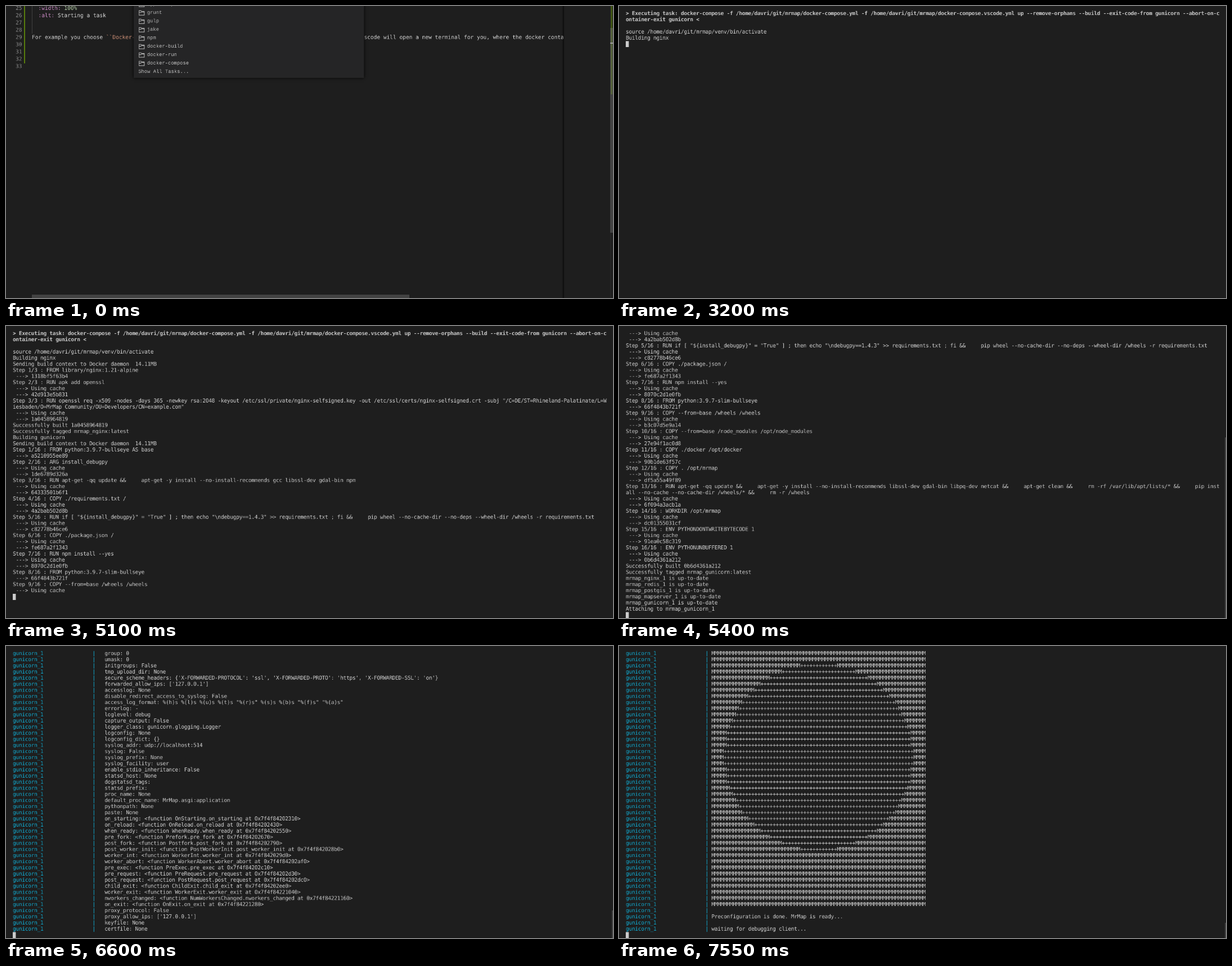
An HTML page that plays this animation: 1079 by 519 pixels, repeating every 8000 ms.

```html
<!DOCTYPE html>
<html lang="en">
<head>
<meta charset="utf-8">
<title>Starting a task</title>
<style>
  html, body { margin: 0; width: 100%; height: 100%; overflow: hidden; background: #1e1e1e; }
  #stage { position: relative; width: 1079px; height: 519px; overflow: hidden; background: #1e1e1e;
    text-rendering: geometricPrecision; }
  #stage div, #stage pre, #stage svg { position: absolute; margin: 0; white-space: pre; }
  .scene { inset: 0; visibility: hidden; }
  .scene.on { visibility: visible; }

  /* Text is laid out on the full-size pixel grid, then reduced as a picture. */
  #stage pre, .popup { font: 14px "DejaVu Sans Mono", monospace;
    transform: scale(.68); transform-origin: 0 0; will-change: transform; }

  #stage .term pre { left: 12.2px; top: 8.3px; line-height: 16px; letter-spacing: -.4286px; color: #ccc; }
  .term i { font-style: normal; color: #11a8cd; }
  .term mark { background: #ccc; color: #1e1e1e; }
  .edge { left: 0; right: 0; bottom: 0; height: 1px; background: #171717; }
  .slider { right: 0; bottom: 0; width: 2px; background: #424242; }

  #stage .num, #stage .code { top: -1.8px; line-height: 19px; }
  .num { left: 17.3px; color: #858585; }
  .code { left: 46.3px; width: 1391px; height: 200px; overflow: hidden; color: #d4d4d4; }
  .key { color: #c586c0; } .val { color: #b5cea8; } .lit { color: #ce9178; }
  .popup { left: 227px; top: -60px; width: 602px; height: 276px; background: #252526; box-shadow: 0 0 8px #000; }
  .popup div { font: 13px/22px "Liberation Mono", monospace; color: #b8b8b8; }
  .popup svg { left: 12.5px; width: 16px; height: 15px; fill: none; stroke: #c0c0c0; stroke-width: 1.3; }
</style>
</head>
<body>
<div id="stage"></div>
<script>
const LOOP = 8000, COLS = 194, ROWS = 47;
const stage = document.getElementById('stage');

function add(parent, tag, cls, text, css) {
  const el = document.createElement(tag);
  if (cls) el.className = cls;
  if (text) el.textContent = text;
  if (css) el.style.cssText = css;
  parent.append(el);
  return el;
}
const box = (parent, x, y, w, h, fill) =>
  add(parent, 'div', '', '', `left:${x}px;top:${y}px;width:${w}px;height:${h}px;background:${fill}`);

// ---- Editor ----
function editor(withPopup) {
  const scene = add(stage, 'div', 'scene');
  box(scene, 46, 0, 1, 49, '#404040');
  box(scene, 32, 0, 2, 101.5, '#587c0c');
  add(scene, 'pre', 'num', [25, 26, 27, 28, 29, 30, 31, 32, 33].join('\n'));
  const code = add(scene, 'pre', 'code');
  const parts = [
    ['key', '  :width:'], ['val', ' 100%\n'],
    ['key', '  :alt:'], ['', ' Starting a task\n\n\n'],
    ['', 'For example you choose '], ['lit', '``Docker-compose``'], ['', ' and '],
    ['lit', '``Continue without scanning the task output``'],
    ['', ', and then vscode will open a new terminal for you, where the docker conta']
  ];
  for (const [cls, text] of parts) add(code, 'span', cls, text);
  box(scene, 988, 0, 4, 519, 'linear-gradient(90deg, #0000, #0009)');
  box(scene, 46, 513, 671, 6, '#424242');
  box(scene, 1074, 0, 1, 519, '#292929');
  box(scene, 1075, 0, 3, 157, '#415613');
  box(scene, 1074, 39, 5, 364, '#79797966');
  box(scene, 1074, 65, 5, 1.5, '#a0a0a0');
  if (withPopup) popup(scene);
  return scene;
}

function popup(scene) {
  const pop = add(scene, 'div', 'popup');
  const items = ['typescript', 'grunt', 'gulp', 'jake', 'npm', 'docker-build', 'docker-run', 'docker-compose', 'Show All Tasks...'];
  items.forEach((name, i) => {
    const y = 73 + i * 22, last = i === items.length - 1;
    add(pop, 'div', '', name, `left:${last ? 12 : 35}px;top:${y}px`);
    if (last) return;
    const icon = document.createElementNS('http://www.w3.org/2000/svg', 'svg');
    icon.innerHTML = '<path d="M.7 13.2V1.5H6l1.8 1.8h6.9v9.9zM.7 6.5h4.8l1.7-1.5h7.5"/>';
    icon.style.top = y + 4 + 'px';
    pop.append(icon);
  });
}

// ---- Terminal text ----
const HOME = '/home/davri/git/mrmap';
const CMD = `> Executing task: docker-compose -f ${HOME}/docker-compose.yml -f ${HOME}/docker-compose.vscode.yml` +
  ' up --remove-orphans --build --exit-code-from gunicorn --abort-on-container-exit gunicorn <';
const SENDING = 'Sending build context to Docker daemon  ';
const PREFIX = 'gunicorn_1'.padEnd(26) + '|';

const wrap = (line, cols = COLS) => line.match(new RegExp(`.{1,${cols}}`, 'g')) || [''];
const wrapAll = lines => lines.flatMap(line => wrap(line));
const service = line => `${PREFIX} ${line}`;
const found = path => service(`Found another file with the destination path '${path}'. It will be ignored since only ` +
  'the first encountered file is collected. If this is not what you want, make sure every static file has a unique path.');

function build(name, steps) {
  const out = [`Building ${name}`, SENDING + '14.11MB'];
  steps.forEach(([cmd, hash], i) => {
    out.push(`Step ${i + 1}/${steps.length} : ${cmd}`);
    if (!cmd.startsWith('FROM')) out.push(' ---> Using cache');
    out.push(` ---> ${hash}`);
  });
  return [...out, `Successfully built ${steps.at(-1)[1]}`, `Successfully tagged mrmap_${name}:latest`];
}

const languages = kind => [`Created initial english ${kind} themes.`,
  ...[1, 2].map(n => `Added language 'locale_${n}' to ${kind} themes.`)];

const log = wrapAll([
  CMD, '', `source ${HOME}/venv/bin/activate`,
  ...build('nginx', [
    ['FROM library/nginx:1.21-alpine', '1318bf5f63b4'],
    ['RUN apk add openssl', '42d913e5b831'],
    ['RUN openssl req -x509 -nodes -days 365 -newkey rsa:2048 -keyout /etc/ssl/private/nginx-selfsigned.key -out /etc/ssl/certs/nginx-selfsigned.crt -subj "/C=DE/ST=Rhineland-Palatinate/L=Wiesbaden/O=MrMap Community/OU=Developers/CN=example.com"', '1a0458964819']
  ]),
  ...build('gunicorn', [
    ['FROM python:3.9.7-bullseye AS base', 'a5210955ee89'],
    ['ARG install_debugpy', '1de6789d326a'],
    ['RUN apt-get -qq update &&     apt-get -y install --no-install-recommends gcc libssl-dev gdal-bin npm', '64333501b6f1'],
    ['COPY ./requirements.txt /', '4a2bab502d8b'],
    ['RUN if [ "${install_debugpy}" = "True" ] ; then echo "\\ndebugpy==1.4.3" >> requirements.txt ; fi &&     pip wheel --no-cache-dir --no-deps --wheel-dir /wheels -r requirements.txt', 'c82778b46ce6'],
    ['COPY ./package.json /', 'fe687a2f1343'],
    ['RUN npm install --yes', '8070c2d1e0fb'],
    ['FROM python:3.9.7-slim-bullseye', '66f4843b721f'],
    ['COPY --from=base /wheels /wheels', 'b3c07d5e9a14'],
    ['COPY --from=base /node_modules /opt/node_modules', '27e94f1ac0d8'],
    ['COPY ./docker /opt/docker', '90b1de63f57c'],
    ['COPY . /opt/mrmap', 'df5a55a49f89'],
    ['RUN apt-get -qq update &&     apt-get -y install --no-install-recommends libssl-dev gdal-bin libpq-dev netcat &&     apt-get clean &&     rm -rf /var/lib/apt/lists/* &&     pip install --no-cache --no-cache-dir /wheels/* &&     rm -r /wheels', '6f094a3acb1a'],
    ['WORKDIR /opt/mrmap', 'dc01355031cf'],
    ['ENV PYTHONDONTWRITEBYTECODE 1', '91ea0c58c319'],
    ['ENV PYTHONUNBUFFERED 1', '0b6d4361a212']
  ]),
  ...['nginx', 'redis', 'postgis', 'mapserver', 'gunicorn'].map(name => `mrmap_${name}_1 is up-to-date`),
  'Attaching to mrmap_gunicorn_1',
  ...[
    'PostgreSQL host is up.. running setup...',
    'WARNING: yacc table file version is out of date',
    'Load categories...', ...languages('inspire'), ...languages('iso'),
    'Load licences...',
    ...['added', 'updated', 'deactivated'].map(verb => `0 licences have been ${verb}.`),
    ...[2, 1, 1, 1, 1].map(n => `Installed ${n} object(s) from 1 fixture(s)`)
  ].map(service),
  ...['custom_bootstrap4', 'tree-style', 'colour_schema'].map(name => found(`css/${name}.css`))
]);

const hooks = `on_starting OnStarting 02310
on_reload OnReload 02430
when_ready WhenReady 02550
pre_fork Prefork 02670
post_fork Postfork 02790
post_worker_init PostWorkerInit 028b0
worker_int WorkerInt 029d0
worker_abort WorkerAbort 02af0
pre_exec PreExec 02c10
pre_request PreRequest 02d30
post_request PostRequest 02dc0
child_exit ChildExit 02ee0
worker_exit WorkerExit 21040
nworkers_changed NumWorkersChanged 21160
on_exit OnExit 21280`.split('\n').map(line => {
  const [key, cls, addr] = line.split(' ');
  return `${key}: <function ${cls}.${key} at 0x7f4f842${addr}>`;
});

const config = [...`config: ./gunicorn.conf.py
wsgi_app: None
bind: ['0.0.0.0:8001']
backlog: 2048
workers: 1
worker_class: uvicorn.workers.UvicornWorker
threads: 1
worker_connections: 1000
max_requests: 0
max_requests_jitter: 0
timeout: 0
graceful_timeout: 30
keepalive: 2
limit_request_line: 4094
limit_request_fields: 100
limit_request_field_size: 8190
reload: True
reload_engine: auto
reload_extra_files: []
spew: False
check_config: False
print_config: False
preload_app: False
sendfile: None
reuse_port: False
chdir: /opt/mrmap
daemon: False
raw_env: []
pidfile: None
worker_tmp_dir: None
user: 0
group: 0
umask: 0
initgroups: False
tmp_upload_dir: None
secure_scheme_headers: {'X-FORWARDED-PROTOCOL': 'ssl', 'X-FORWARDED-PROTO': 'https', 'X-FORWARDED-SSL': 'on'}
forwarded_allow_ips: ['127.0.0.1']
accesslog: None
disable_redirect_access_to_syslog: False
access_log_format: %(h)s %(l)s %(u)s %(t)s "%(r)s" %(s)s %(b)s "%(f)s" "%(a)s"
errorlog: -
loglevel: debug
capture_output: False
logger_class: gunicorn.glogging.Logger
logconfig: None
logconfig_dict: {}
syslog_addr: udp://localhost:514
syslog: False
syslog_prefix: None
syslog_facility: user
enable_stdio_inheritance: False
statsd_host: None
dogstatsd_tags:
statsd_prefix:
proc_name: None
default_proc_name: MrMap.asgi:application
pythonpath: None
paste: None`.split('\n'),
  ...hooks,
  'proxy_protocol: False', "proxy_allow_ips: ['127.0.0.1']", 'keyfile: None', 'certfile: None'
].map(line => service('  ' + line));

const words = ['base', 'forms', 'login', 'widgets', 'rtl', 'changelists', 'dashboard', 'fonts', 'responsive', 'autocomplete', 'nav_sidebar'];
const statics = [
  ...wrapAll(['css/theme.css', ...words.flatMap(w => [`admin/css/${w}.css`, `admin/js/${w}.js`])].map(found)).slice(1),
  service('Load fixtures...')
];

// Text block of 42 x 70 characters with one plain disc; a cell is twice as high as wide.
const disc = Array.from({ length: 42 }, (_, y) =>
  Array.from({ length: 70 }, (_, x) => Math.hypot((x - 34.5) / 2, y - 17) < 15.3 ? '+' : 'M').join(''));
const banner = [...disc, '', 'Preconfiguration is done. MrMap is ready...', '', 'waiting for debugging client...'].map(service);

// ---- Terminal screens ----
function terminal(rows, { col = 0, total = rows.length } = {}) {
  const scene = add(stage, 'div', 'scene term');
  add(scene, 'div', 'edge');
  const pre = add(scene, 'pre');
  const view = rows.slice(-ROWS);
  view.forEach((row, i) => {
    if (i === view.length - 1 && col >= 0) {
      pre.append(row.slice(0, col));
      add(pre, 'mark', '', row[col] || ' ');
      pre.append(row.slice(col + 1));
    } else if (row.startsWith(PREFIX)) {
      add(pre, 'i', '', PREFIX);
      pre.append(row.slice(PREFIX.length) + '\n');
    } else {
      add(pre, row && CMD.includes(row) ? 'b' : 'span', '', row + '\n');
    }
  });
  if (total > ROWS) add(scene, 'div', 'slider', '', `height:${513 * ROWS / total}px`);
  return scene;
}
const logged = (n, last = '', col = 0) => terminal([...log.slice(0, n), last], { col });
const page = (rows, total) => terminal([...rows, ''], { total });

const steps = [
  [0, editor(true)],
  [650, editor(false)],
  [1000, terminal([''], { col: -1 })],
  [1200, terminal([...Array(17).fill(''), ...wrap(CMD, 80), '', ''])],
  [1950, logged(4)],
  [3200, logged(5)],
  [3650, logged(5, SENDING + '14.11MB')],
  [3950, logged(18)],
  [4350, logged(18, SENDING + '6.681MB')],
  [4800, logged(18, SENDING + '14.11MB')],
  [5100, logged(43)],
  [5400, logged(74)],
  [6050, logged(97, log[97], log[97].length)],
  [6300, page(config.slice(0, 46), 461)],
  [6600, page(config.slice(-46), 492)],
  [6850, page(statics, 600)],
  [7550, page(banner, 893)]
];

const start = performance.now();
let shown;
function tick() {
  const t = Math.max(0, performance.now() - start) % LOOP;
  const scene = steps.findLast(([at]) => at <= t)[1];
  if (scene !== shown) {
    if (shown) shown.classList.remove('on');
    scene.classList.add('on');
    shown = scene;
  }
  requestAnimationFrame(tick);
}
tick();
</script>
</body>
</html>
```
